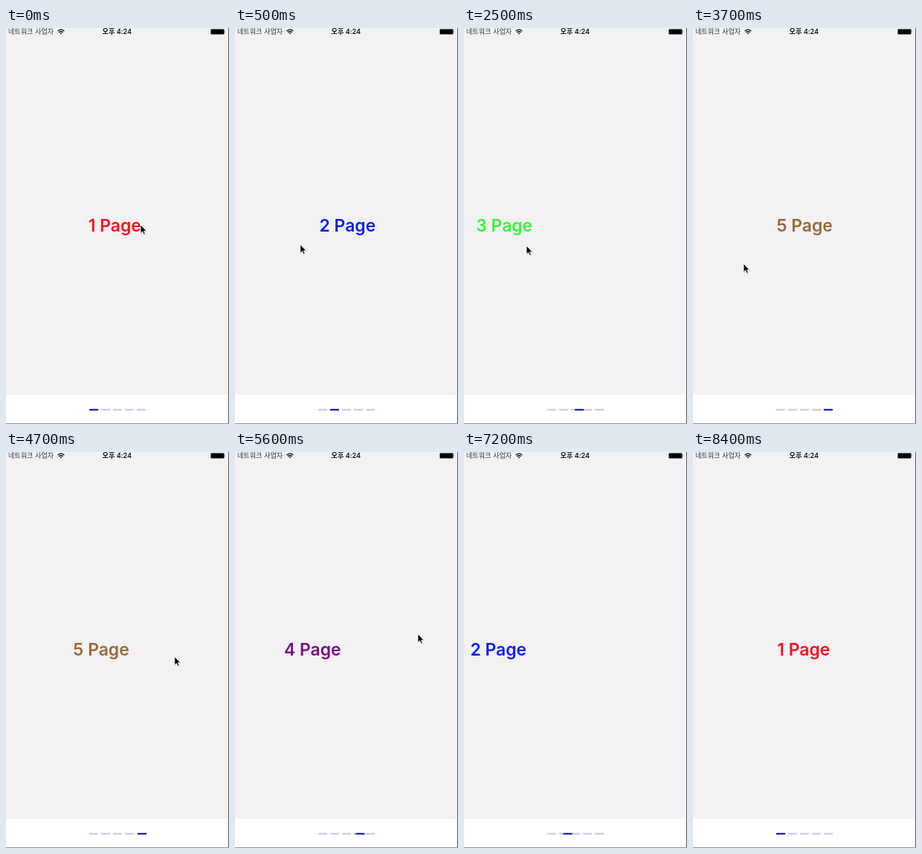
Write an HTML page that moves like this. It is 300 px wide and 531 px high and loops after 9.1 s.

```html
<!DOCTYPE html>
<html lang="ko">
<head>
<meta charset="utf-8">
<title>Page indicator</title>
<style>
  html, body { margin: 0; width: 100%; height: 100%; overflow: hidden; background: #f3f1f4; }
  svg { display: block; width: 100vw; height: 100vh; }
  .page { font: 600 22.9px Inter, sans-serif; text-anchor: middle; }
  .carrier { font: 400 9.1px "Noto Sans CJK KR", "Noto Sans CJK", sans-serif; fill: #333; }
  .clock { font: 600 9.1px Inter, "Noto Sans CJK KR", "Noto Sans CJK", sans-serif; text-anchor: middle; fill: #111; }
</style>
</head>
<body>
<svg viewBox="0 0 300 531" preserveAspectRatio="none">
  <rect width="300" height="531" fill="#f3f1f4"/>
  <g id="pages"></g>

  <text class="carrier" x="3" y="8.4">네트워크 사업자</text>
  <g fill="none" stroke="#111" stroke-width="1.3">
    <path d="M69.6 4.2Q74 0 78.4 4.2M71.3 6Q74 3.5 76.7 6"/>
    <path d="M72.6 7L74 8.6L75.4 7Q74 5.9 72.6 7Z" fill="#111" stroke="none"/>
  </g>
  <text class="clock" x="149.4" y="8.4">오후 4:24</text>
  <rect x="275.5" y="1.5" width="18" height="7" rx="1.2" fill="#050505" stroke="#77767a" stroke-width=".8"/>
  <path d="M294.3 3.6Q295.6 5 294.3 6.4Z" fill="#333"/>

  <rect y="492" width="300" height="39" fill="#fff"/>
  <g id="dashes" fill="#cbc9f1"></g>
  <rect id="active" x="112" y="510.8" width="12" height="2.2" fill="#1a20b8"/>

  <rect x="299" width="1" height="531" fill="#55545a"/>
  <rect y="530" width="300" height="1" fill="#96959a"/>

  <g id="cursor">
    <path d="M.6 1.2V12.6L3.2 10.2L5 14L6.9 13.2L5.1 9.4H8.6Z" fill="#000" opacity=".15"/>
    <path d="M0 0V11.3L2.6 8.9L4.4 12.9L6.3 12L4.5 8.2H8Z" fill="#000" stroke="#fff" stroke-width=".8"/>
  </g>
</svg>
<script>
const LOOP = 9100, STEP = 100, WIDTH = 300;
const COLORS = ['#fa101c', '#0a20ef', '#2ffb30', '#78107e', '#9a6837'];
const $ = id => document.getElementById(id);

// Moments at which each swipe is halfway to the next or previous page
const forward = [238, 1570, 2538, 3361];
const backward = [5514, 6470, 7168, 7948];

// Key points of the pointer tip: time, x, y. It ends outside the stage.
const pointer = [
  [0, 181, 264], [300, 62, 290], [1400, 204, 292], [1600, 84, 292],
  [2300, 179, 292], [2500, 84, 292], [3200, 138, 300], [3700, 68, 316],
  [4300, 278, 296], [5300, 150, 242], [5600, 246, 244], [6200, 150, 203],
  [6500, 262, 203], [7000, 150, 198], [7200, 310, 198]
];

const swiped = (t, middles) =>
  middles.reduce((sum, middle) => sum + 1 / (1 + Math.exp((middle - t) / 50)), 0);

function pagePosition(t) {
  const overscroll = .113 * Math.exp(-(((t - 4600) / 150) ** 2));
  return swiped(t, forward) - swiped(t, backward) + overscroll;
}

function pointerAt(t) {
  const i = pointer.findLastIndex(key => key[0] <= t);
  const [start, ...from] = pointer[i];
  if (i === pointer.length - 1) return from;
  const [end, ...to] = pointer[i + 1];
  return from.map((value, n) => value + (to[n] - value) * (t - start) / (end - start));
}

COLORS.forEach((color, i) => {
  const x = (i ? 149.8 : 148.8) + i * WIDTH;
  $('pages').innerHTML += `<text class="page" x="${x}" y="273" fill="${color}">${i + 1} Page</text>`;
  $('dashes').innerHTML += `<rect x="${112 + 16 * i}" y="510.8" width="12" height="2.2"/>`;
});

function draw(now) {
  const t = Math.floor(now % LOOP / STEP) * STEP;
  const position = pagePosition(t);
  $('pages').setAttribute('transform', `translate(${-position * WIDTH} 0)`);
  $('active').setAttribute('x', 112 + 16 * position);
  $('cursor').setAttribute('transform', `translate(${pointerAt(t).join(' ')})`);
}

let origin;
function tick(now) {
  origin ??= now;
  draw(now - origin);
  requestAnimationFrame(tick);
}
draw(0);
requestAnimationFrame(tick);
</script>
</body>
</html>
```
